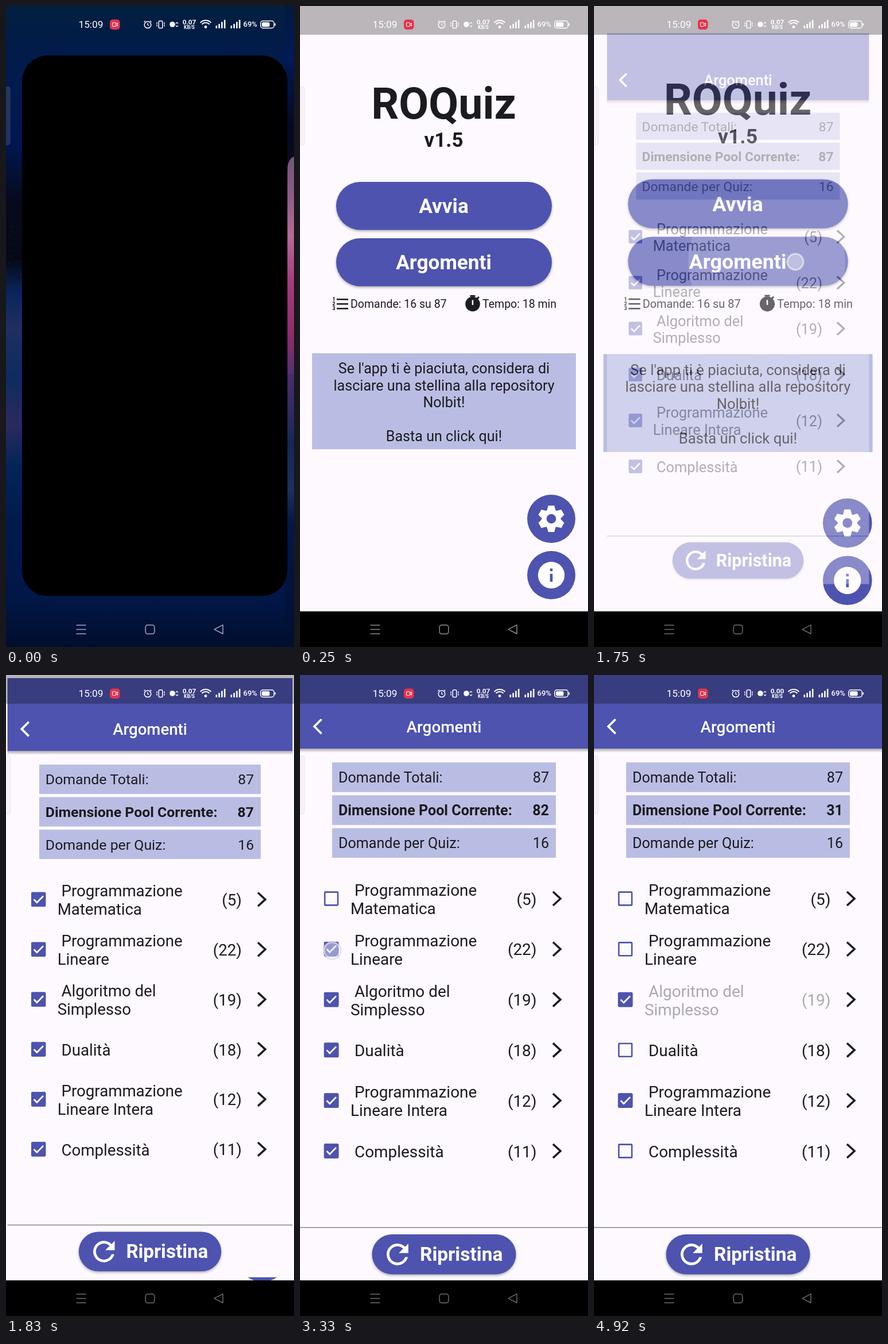
Recreate the animation shown at these times as an HTML page. Size 502 px wide and 1115 px high, loop 5.08 s.

```html
<!DOCTYPE html>
<html lang="it">
<head>
<meta charset="utf-8">
<title>ROQuiz</title>
<style>
  html, body { margin: 0; width: 100%; height: 100%; overflow: hidden; background: #000; }
  svg { display: block; width: 100%; height: 100%; }
  text { font-family: Roboto, sans-serif; white-space: pre; }
  .raised { filter: drop-shadow(0 2px 2px rgba(0, 0, 0, .32)); }
</style>
</head>
<body>
<svg id="stage" viewBox="0 0 502 1115" preserveAspectRatio="none"></svg>
<script>
const LOOP = 5080, FPS = 12;
const BLUE = '#4d53af', PALE = '#babde3', PAPER = '#fef9ff', INK = '#1c1b1f';

const rect = (x, y, w, h, fill, rx = 0, extra = '') =>
  `<rect x="${x}" y="${y}" width="${w}" height="${h}" rx="${rx}" fill="${fill}" ${extra}/>`;
const circle = (x, y, r, fill, extra = '') =>
  `<circle cx="${x}" cy="${y}" r="${r}" fill="${fill}" ${extra}/>`;
const line = (d, stroke, width, extra = '') =>
  `<path d="${d}" fill="none" stroke="${stroke}" stroke-width="${width}" ${extra}/>`;
const text = (s, x, y, size, { fill = INK, weight = 400, anchor = 'start', id = '' } = {}) =>
  `<text ${id && `id="${id}"`} x="${x}" y="${y}" font-size="${size}" font-weight="${weight}"
    fill="${fill}" text-anchor="${anchor}">${s}</text>`;
const gradient = (id, stops) =>
  `<linearGradient id="${id}" gradientUnits="userSpaceOnUse" x1="0" y1="0" x2="0" y2="1115">${
    stops.map(([y, c]) => `<stop offset="${y / 1115}" stop-color="${c}"/>`).join('')}</linearGradient>`;

const rows = [
  { lines: ['Programmazione', 'Matematica'], count: 5, off: 33 },
  { lines: ['Programmazione', 'Lineare'], count: 22, off: 42 },
  { lines: ['Algoritmo del', 'Simplesso'], count: 19, dim: 59 },
  { lines: ['Dualità'], count: 18, off: 49 },
  { lines: ['Programmazione', 'Lineare Intera'], count: 12 },
  { lines: ['Complessità'], count: 11, off: 57 },
];
const taps = [[19, 351, 445], [31, 54, 391], [40, 56, 479], [47, 57, 653], [55, 54, 823]];

function wallpaper() {
  let stars = '';
  for (let i = 0; i < 34; i++) {
    const x = (i * 17.3) % 28, y = 375 + (i * 41.7) % 115;
    stars += circle(x, y, .5, '#53658b', 'opacity=".6"');
  }
  return rect(0, 0, 502, 1115, 'url(#sky)') + stars +
    rect(486, 0, 16, 1115, 'url(#skyRight)') +
    `<path d="M502 262Q490 266 490 290V640H502Z" fill="url(#nebula)"/>`;
}

function gear(x, y) {
  let teeth = '';
  for (let a = 0; a < 360; a += 60)
    teeth += `<path d="M-8-13L-5.2-23H5.2L8-13Z" fill="#fff" transform="rotate(${a})"/>`;
  return `<g transform="translate(${x} ${y})">${teeth}${circle(0, 0, 16.5, '#fff')}${circle(0, 0, 8.3, BLUE)}</g>`;
}

function bigButton(label, y, inside = '') {
  return rect(63, y, 376, 83.5, BLUE, 41.75, 'class="raised"') + inside +
    text(label, 250.5, y + 54.3, 35.2, { fill: '#fff', weight: 700, anchor: 'middle' });
}

function homePage() {
  const note = ["Se l'app ti è piaciuta, considera di", 'lasciare una stellina alla repository',
    'Nolbit!', '', 'Basta un click qui!'];
  const ripple = `<g clip-path="url(#pill)">${circle(0, 0, 0, '#fff', 'id="ripple" opacity=".16"')}</g>`;
  const numbered = [0, 1, 2].map(i =>
    rect(64, 509 + i * 8, 20, 2.6, INK) +
    text(i + 1, 56.5, 513 + i * 8, 8.5, { weight: 900 })).join('');
  const timer = circle(301, 518.5, 12.8, INK) + rect(296.5, 503, 9, 2.8, INK) +
    line('M308 510L312 506', INK, 3) + rect(299.7, 511.5, 2.6, 8.5, PAPER);
  return rect(0, 0, 502, 1053, PAPER) +
    text('ROQuiz', 250.5, 196, 75.3, { weight: 700, anchor: 'middle' }) +
    text('v1.5', 250.5, 245, 34.9, { weight: 700, anchor: 'middle' }) +
    bigButton('Avvia', 306) + bigButton('Argomenti', 404, ripple) +
    numbered + text('Domande: 16 su 87', 88, 525, 19.5) +
    timer + text('Tempo: 18 min', 318, 525, 19.5) +
    rect(21, 604, 460, 167, PALE) +
    note.map((s, i) => text(s, 251, 639.3 + i * 29.3, 25.1, { anchor: 'middle' })).join('') +
    circle(438, 892, 42, BLUE) + gear(438, 892) +
    circle(438, 990, 42, BLUE) + circle(438, 990, 23.2, '#fff') +
    rect(435.7, 978.5, 4.6, 4.6, BLUE) + rect(435.7, 987.7, 4.6, 13.8, BLUE);
}

function topicRow({ lines, count }, i) {
  const y = 389 + i * 87.8;
  const first = lines.length > 1 ? y - 5 : y + 11;
  const label = lines.map((s, n) => text(s, n ? 88 : 95, first + n * 32, 27.9)).join('');
  return rect(43.2, y - 11.4, 22.8, 22.8, 'none', 1, `stroke="${BLUE}" stroke-width="2.6"`) +
    `<g id="check${i}">${rect(41.8, y - 12.8, 25.6, 25.6, BLUE, 2)}${
      line(`M46.5 ${y}L51.8 ${y + 5.5}L63 ${y - 6}`, '#fff', 2.8)}</g>` +
    `<g id="label${i}">${label}${text(`(${count})`, 412.5, y + 10.5, 27.9, { anchor: 'end' })}</g>` +
    line(`M441 ${y - 12}L454 ${y}L441 ${y + 12}`, INK, 3.6);
}

function topicsPage() {
  const totals = [['Domande Totali:', 87], ['Dimensione Pool Corrente:', 87], ['Domande per Quiz:', 16]];
  return rect(0, 0, 502, 1053, PAPER) +
    rect(0, 128, 502, 7, 'url(#shade)') + rect(0, 0, 502, 128, BLUE) +
    line('M37.5 77L25 89.5L37.5 102', '#fff', 3.8) +
    text('Argomenti', 251, 99.5, 27.9, { fill: '#fff', weight: 500, anchor: 'middle' }) +
    totals.map(([s, n], i) => {
      const y = 152 + i * 57.2, weight = i === 1 ? 700 : 400;
      return rect(56, y, 390, 51.6, PALE) + text(s, 67, y + 35, 25.1, { weight }) +
        text(n, 434, y + 35, 25.1, { weight, anchor: 'end', id: 'total' + i });
    }).join('') +
    rows.map(topicRow).join('') +
    rect(0, 960.5, 502, 1.3, '#77757a') +
    rect(125.5, 973, 251, 69.5, BLUE, 34.7, 'class="raised"') +
    `<path transform="translate(141.6 979.5) scale(2.36)" fill="#fff" d="M17.65 6.35C16.2 4.9 14.2 4 12 4a8 8 0 1 0 7.73 10h-2.08A6 6 0 1 1 12 6c1.66 0 3.14.69 4.22 1.78L13 11h7V4z"/>` +
    text('Ripristina', 209, 1019, 33.5, { fill: '#fff', weight: 700 });
}

function statusBar() {
  const white = { fill: '#fff' };
  const bars = x => [5, 8, 11.5, 15].map((h, i) => rect(x + i * 4.8, 39 - h, 2.6, h, '#fff', 1)).join('');
  const arcs = [5, 9, 13].map((r, i) => {
    const dx = r * .72, dy = r * .69;
    return i ? line(`M${348 - dx} ${38 - dy}A${r} ${r} 0 0 1 ${348 + dx} ${38 - dy}`, '#fff', 2.1) : '';
  }).join('');
  return text('15:09', 126.5, 38.3, 17.2, white) +
    rect(181, 23.5, 17.5, 17.5, '#e4344c', 5) +
    rect(185.5, 29, 6.2, 6.5, 'none', 1, 'stroke="#fff" stroke-width="1"') +
    line('M192 31.5L194.5 29.5V35L192 33', '#fff', 1) +
    circle(247, 32.8, 5.8, 'none', 'stroke="#fff" stroke-width="1.5"') +
    line('M247 29.5V33L249.5 34M240.5 28L243 25.7M253.5 28L251 25.7', '#fff', 1.3) +
    rect(266.2, 26, 6.6, 12.5, 'none', 1.5, 'stroke="#fff" stroke-width="1.5"') +
    line('M263 28.5V36M276 28.5V36', '#fff', 1.4, 'stroke-dasharray="3 1"') +
    circle(290, 32, 4.8, '#fff') +
    line('M296 30.5L298 28.5L300 30.5M296 34L298 36L300 34', '#fff', 1.2) +
    text('0.07', 319.5, 32, 11.8, { fill: '#fff', weight: 600, anchor: 'middle', id: 'speed' }) +
    text('KB/S', 319.5, 40.2, 8.3, { fill: '#fff', weight: 700, anchor: 'middle' }) +
    arcs + circle(348, 36.5, 2.4, '#fff') + bars(365.5) + bars(391.5) +
    text('69%', 413.5, 36.4, 13, { fill: '#fff', weight: 500 }) +
    rect(443.8, 26, 23.4, 12.4, 'none', 4, 'stroke="#fff" stroke-width="1.5"') +
    rect(446, 28.2, 13.5, 8, '#fff', 2) + rect(468.4, 30, 1.6, 4.4, '#fff', .8);
}

const navigation = '<g id="nav" fill="none" stroke-width="1.5">' +
  '<path d="M122.5 1077H139.5M122.5 1084.5H139.5M122.5 1092H139.5"/>' +
  '<rect x="243.2" y="1076.7" width="15.6" height="15.6" rx="3.8"/>' +
  '<path d="M363 1084.3L378 1076.6V1092Z" stroke-linejoin="round"/></g>';

const stage = document.getElementById('stage');
stage.innerHTML = `<defs>
  ${gradient('sky', [[0, '#02203f'], [70, '#021b49'], [150, '#001b50'], [240, '#00164f'], [340, '#070a1c'],
    [440, '#050916'], [500, '#0a255c'], [560, '#202e60'], [640, '#0e2b60'], [730, '#2a2a5e'],
    [800, '#03245a'], [900, '#011a4c'], [1030, '#011747'], [1115, '#010e2c']])}
  ${gradient('skyRight', [[0, '#03193f'], [90, '#021a58'], [210, '#04091f'], [270, '#090a1d'],
    [600, '#5a2d70'], [680, '#3a2b6b'], [760, '#15275b'], [840, '#1c2f62'], [900, '#03184a'], [1115, '#010f30']])}
  ${gradient('nebula', [[262, '#735679'], [330, '#8d5c86'], [400, '#b66a96'], [480, '#a43c7c'],
    [570, '#8f2d6e'], [640, '#552f73']])}
  <linearGradient id="shade" x2="0" y2="1"><stop stop-color="#000" stop-opacity=".32"/>
    <stop offset="1" stop-color="#000" stop-opacity="0"/></linearGradient>
  <clipPath id="pill">${rect(63, 404, 376, 83.5, '#000', 41.75)}</clipPath>
  <clipPath id="frame"><rect id="windowShape"/></clipPath>
</defs>
${wallpaper()}
<g clip-path="url(#frame)">
  ${rect(0, 0, 502, 1115, '#000')}
  <g id="home">${homePage()}</g>
  <g id="topics">${topicsPage()}</g>
  ${rect(0, 0, 502, 50, '#000', 0, 'opacity=".27"')}
  ${rect(0, 1053, 502, 62, '#000')}
</g>
<rect id="handle" x="-8" y="140" width="15.8" height="102" rx="5"/>
${statusBar()}${navigation}
<g id="touch">${circle(0, 0, 15.5, '#e2e2f0', 'fill-opacity=".5" stroke="#b9b9cc" stroke-opacity=".55" stroke-width="1.2"')}
  ${circle(0, 0, 13.5, 'none', 'stroke="#fff" stroke-opacity=".55" stroke-width="2"')}</g>`;

const $ = id => document.getElementById(id);
const set = (id, attrs) => { for (const k in attrs) $(id).setAttribute(k, attrs[k]); };
const clamp = v => Math.min(1, Math.max(0, v));
const mix = (a, b, p) => a + (b - a) * p;

function bezier(a, b, c, d, s) {
  const r = 1 - s;
  return r * r * r * a + 3 * r * r * s * b + 3 * r * s * s * c + s * s * s * d;
}
// Two joined cubics: a short acceleration, then a long settle.
function emphasized(t) {
  if (t <= 0 || t >= 1) return clamp(t);
  const [xs, ys] = t <= 1 / 6
    ? [[0, .05, .1333, 1 / 6], [0, 0, .06, .4]]
    : [[1 / 6, .2083, .25, 1], [.4, .82, 1, 1]];
  let lo = 0, hi = 1;
  for (let i = 0; i < 24; i++) {
    const mid = (lo + hi) / 2;
    if (bezier(...xs, mid) < t) lo = mid; else hi = mid;
  }
  return bezier(...ys, lo);
}
const zoom = s => `translate(251 526.5) scale(${s}) translate(-251 -526.5)`;

function draw(ms) {
  const step = Math.floor((ms + 4) * FPS / 1000);
  const now = step * 1000 / FPS;

  const open = 1 - (1 - clamp(step / 3)) ** 3;
  set('windowShape', {
    x: mix(28, 0, open), y: mix(86, 0, open),
    width: mix(462.5, 502, open), height: mix(940.5, 1115, open), rx: mix(45, 0, open),
  });

  const t = clamp((now - 1700) / 300), p = emphasized(t);
  const fade = clamp((t - .125) / .125);
  set('home', { transform: zoom(mix(1, 1.05, p)), display: step >= 2 && t < 1 ? 'inline' : 'none' });
  set('topics', { transform: zoom(mix(.85, 1, p)), opacity: fade, display: fade > 0 ? 'inline' : 'none' });

  const spread = clamp((step - 18) / 3);
  set('ripple', { cx: mix(351, 300, spread), cy: 446, r: step < 19 ? 0 : mix(0, 134, spread) });

  let pool = 87;
  rows.forEach(({ count, off, dim }, i) => {
    if (step >= off) pool -= count;
    set('check' + i, { opacity: off ? 1 - clamp((step - off + 1) / 3) : 1 });
    set('label' + i, { opacity: step >= dim ? .36 : 1 });
  });
  $('total1').textContent = pool;
  $('speed').textContent = step >= 47 ? '0.00' : '0.07';

  const tap = taps.find(([start]) => step >= start && step < start + 3);
  set('touch', tap
    ? { display: 'inline', transform: `translate(${tap[1]} ${tap[2]})` }
    : { display: 'none' });

  set('handle', step < 2
    ? { fill: '#999', 'fill-opacity': .22, stroke: 'none' }
    : { fill: '#888', 'fill-opacity': .06, stroke: '#888', 'stroke-opacity': .16 });
  set('nav', { stroke: step < 3 ? '#a5a5c4' : step < 8 ? '#8c8c8c' : '#6c6c6c' });
}

const began = performance.now();
function tick() {
  draw((performance.now() - began) % LOOP);
  requestAnimationFrame(tick);
}
tick();
</script>
</body>
</html>
```
